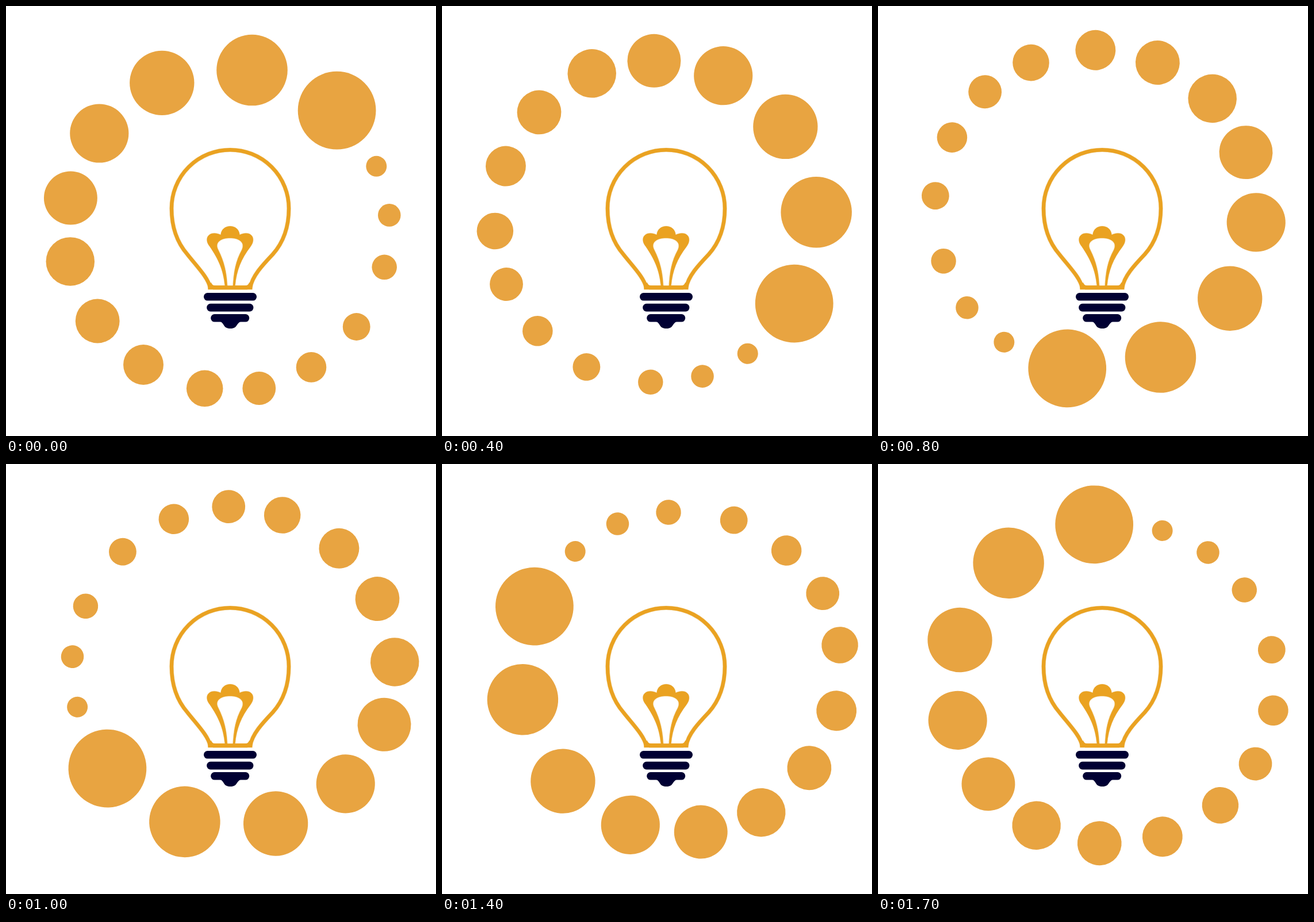
Write an HTML page with a canvas that moves like this. It is 748 px wide and 748 px high and loops after 1.8 s.

```html
<!DOCTYPE html>
<html lang="en">
<head>
<meta charset="utf-8">
<title>Light bulb loader</title>
<style>
  html, body { margin: 0; width: 100%; height: 100%; overflow: hidden; background: #fff; }
  canvas { display: block; width: 748px; height: 748px; }
</style>
</head>
<body>
<canvas id="stage" width="748" height="748"></canvas>
<script>
const ctx = document.getElementById('stage').getContext('2d');
const BALL = '#e8a441', BULB = '#eaa221', FRINGE = '#f3dfb8', NAVY = '#000033';
const STEP = 100, STEPS = 18;

// Ball centres relative to the pivot, largest first.
const balls = [
  [188.1, -190.8], [40.5, -260.9], [-116.2, -238.7], [-225.2, -151],
  [-275.1, -38.5], [-275.7, 71.9], [-228.3, 175.5], [-148.5, 251.5],
  [-41.8, 292.8], [52.8, 292.5], [143.5, 255.9], [222.2, 185.5],
  [270.7, 81.8], [279.3, -8.6], [256.8, -93.7]
];
const FIRST_RADIUS = 67.9, SHRINK = 0.9095;

// The turn is three passes of the same six uneven steps: [x, y, degrees].
const passes = [[387.5, 372.5, 0], [392.6, 371.3, 111], [396.9, 371.8, 215]];
const poses = [
  [0, 0, 0], [0, 1, 15.75], [-0.35, 6.45, 36.8],
  [-0.2, 7, 55.5], [0, 0, 78.2], [-2.4, 1.2, 95.4]
];

const glass = new Path2D(
  'M355 490 C352 473 332 453 315.5 432 C299 413 288 386 288 352 ' +
  'A102 101.8 0 0 1 492 352 C492 386 481 413 464 432 C446 451 428 470 425 490');
const neck = new Path2D(
  'M351.3 493.3 L351.3 484 L357 481 Q358.5 486.3 364 486.3 ' +
  'L416 486.3 Q421.5 486.3 423 481 L428.5 484 L428.5 493.3 Z');
const filament = new Path2D(
  'M380.8 487 C378 458 369 440 354.5 418.5 C342 403 355 389 373.5 398 ' +
  'C375 378 405 378 406.5 398 C425 389 437 403 425.5 418.5 C409 440 401 460 398.5 487 Z');
const filamentGap = new Path2D(
  'M385.3 487 C384 463 380 445 369.5 424 C363 411 374 404 389.7 404 ' +
  'C405 404 416 411 410 424 C399 444 396 462 394.5 487 Z');
const tip = new Path2D('M370 548 C381 550 376 561 390.5 561 C404 561 400 550 411 548 Z');

function spin([x, y, degrees]) {
  ctx.translate(x, y);
  ctx.rotate(degrees * Math.PI / 180);
}

function drawRing(step) {
  ctx.save();
  spin(passes[Math.floor(step / 6)]);
  spin(poses[step % 6]);
  ctx.fillStyle = BALL;
  balls.forEach(([x, y], i) => {
    ctx.beginPath();
    ctx.arc(x, y, FIRST_RADIUS * SHRINK ** i, 0, Math.PI * 2);
    ctx.fill();
  });
  ctx.restore();
}

function outline(path, color, width) {
  ctx.strokeStyle = color;
  ctx.lineWidth = width;
  ctx.stroke(path);
}

function fill(path, color) {
  ctx.fillStyle = color;
  ctx.fill(path);
}

function bar(x, y, width) {
  ctx.beginPath();
  ctx.roundRect(x, y, width, 13.6, 6.5);
  ctx.fill();
}

function drawBulb() {
  outline(glass, FRINGE, 7.6);
  outline(glass, BULB, 6.4);
  fill(neck, BULB);
  outline(filament, FRINGE, 1);
  fill(filament, BULB);
  fill(filamentGap, '#fff');
  outline(filamentGap, FRINGE, 0.6);
  ctx.fillStyle = BULB;
  ctx.fillRect(360, 486.3, 60, 7);
  ctx.fillStyle = NAVY;
  bar(344, 499, 92);
  bar(349.2, 517.8, 81.2);
  bar(356.2, 536, 67);
  ctx.fill(tip);
}

function draw(now) {
  ctx.fillStyle = '#fff';
  ctx.fillRect(0, 0, 748, 748);
  drawRing(Math.floor(now / STEP) % STEPS);
  drawBulb();
}

let start;
function tick(now) {
  start ??= now;
  draw(now - start);
  requestAnimationFrame(tick);
}
draw(0);
requestAnimationFrame(tick);
</script>
</body>
</html>
```
